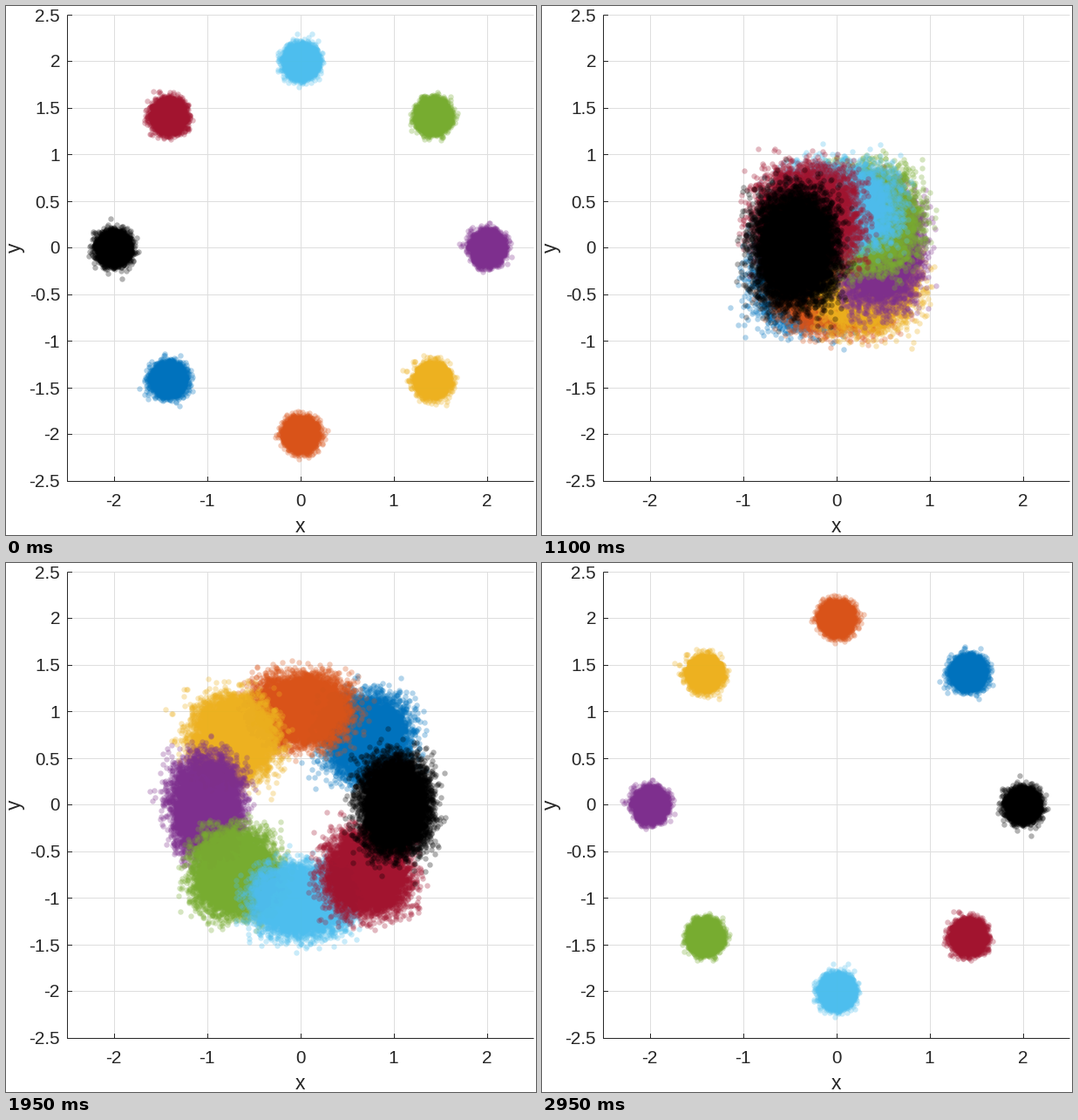
A matplotlib script for the animation above (3000 ms loop, 608 by 607 pixels).

```python
import numpy as np
import matplotlib.pyplot as plt
from matplotlib.animation import FuncAnimation

W, H, DPI = 608, 607, 64
PT = 72 / DPI                       # points per pixel
UNIT, X0, Y0 = 107, 338, 277.5      # data scale and origin in pixels
LEFT, RIGHT, TOP, BOTTOM = 70.5, 605.5, 10.5, 545.5
FRAMES, STEP = 60, 50
COUNT, SIGMA, RING = 8000, 0.072, 2
INK, GRID = "#262626", "#DEDEDE"
COLORS = ["#0072BD", "#D95319", "#EDB120", "#7E2F8E",
          "#77AC30", "#4DBEEE", "#A2142F", "#000000"]

rng = np.random.default_rng(8)
noise = rng.standard_normal((len(COLORS), COUNT, 2))
angles = np.pi * 1.25 + np.arange(len(COLORS)) * np.pi / 4
heads = np.column_stack([np.cos(angles), np.sin(angles)])

fig = plt.figure(figsize=(W / DPI, H / DPI), dpi=DPI, facecolor="white")
ax = fig.add_axes([0, 0, 1, 1])
ax.set(xlim=(0, W), ylim=(H, 0))
ax.axis("off")


def line(xs, ys, color, z):
    ax.plot(xs, ys, color=color, lw=PT, zorder=z, snap=False,
            solid_capstyle="butt")


def label(x, y, text, px, **kw):
    ax.text(x, y, text, fontsize=px * PT, family="Liberation Sans",
            color=INK, va="baseline", **kw)


def draw_axes():
    for v in np.arange(-2, 3):
        x = np.floor(X0 + UNIT * v) + 0.5
        line([x, x], [TOP, BOTTOM], GRID, 1)
        line([x, x], [BOTTOM - 5.5, BOTTOM], INK, 2)
        label(x - 1, 574.5, f"{v}", 20.8, ha="center")
    for v in np.arange(-2.5, 2.6, 0.5):
        y = np.floor(Y0 - UNIT * v) + 0.5
        line([LEFT, RIGHT], [y, y], GRID, 1)
        line([LEFT, LEFT + 5.5], [y, y], INK, 2)
        label(62, y + 7, f"{v:g}", 20.8, ha="right")
    line([LEFT, LEFT], [TOP, BOTTOM + 0.5], INK, 2)
    line([LEFT - 0.5, RIGHT], [BOTTOM, BOTTOM], INK, 2)
    label(X0 - 0.5, 604.5, "x", 22.9, ha="center")
    label(16.5, Y0, "y", 22.9, ha="center", rotation=90,
          rotation_mode="anchor")


def ease(u, start=0.62, end=0.17):
    """Cubic from 0 to 1 with the given end speeds."""
    return (u * u * (3 - 2 * u) + start * u * (1 - u) ** 2
            - end * u * u * (1 - u))


draw_axes()
clouds = [ax.plot([], [], "o", ms=6.4 * PT, mew=0, color=c, alpha=0.3,
                  zorder=3 + i)[0] for i, c in enumerate(COLORS)]


def update(frame):
    # clusters swap sides, swelling as they crowd through the middle
    turn = 1 - 2 * ease(frame / (FRAMES - 1))
    swell = max(0, 1 - turn ** 2) ** 1.2
    across, along = 1 + 3.4 * swell, 1 + 2.15 * swell
    for cloud, head, n in zip(clouds, heads, noise):
        scale = SIGMA * (across + (along - across) * head ** 2)
        # pull in far points per axis, which squares the blob off
        spread = scale * n / np.sqrt(1 + swell * (n / 4.5) ** 2)
        x, y = (RING * turn * head + spread).T
        cloud.set_data(X0 + UNIT * x, Y0 - UNIT * y)
    return clouds


anim = FuncAnimation(fig, update, frames=FRAMES, interval=STEP,
                     repeat=True, repeat_delay=0, blit=False)
plt.show()
```
